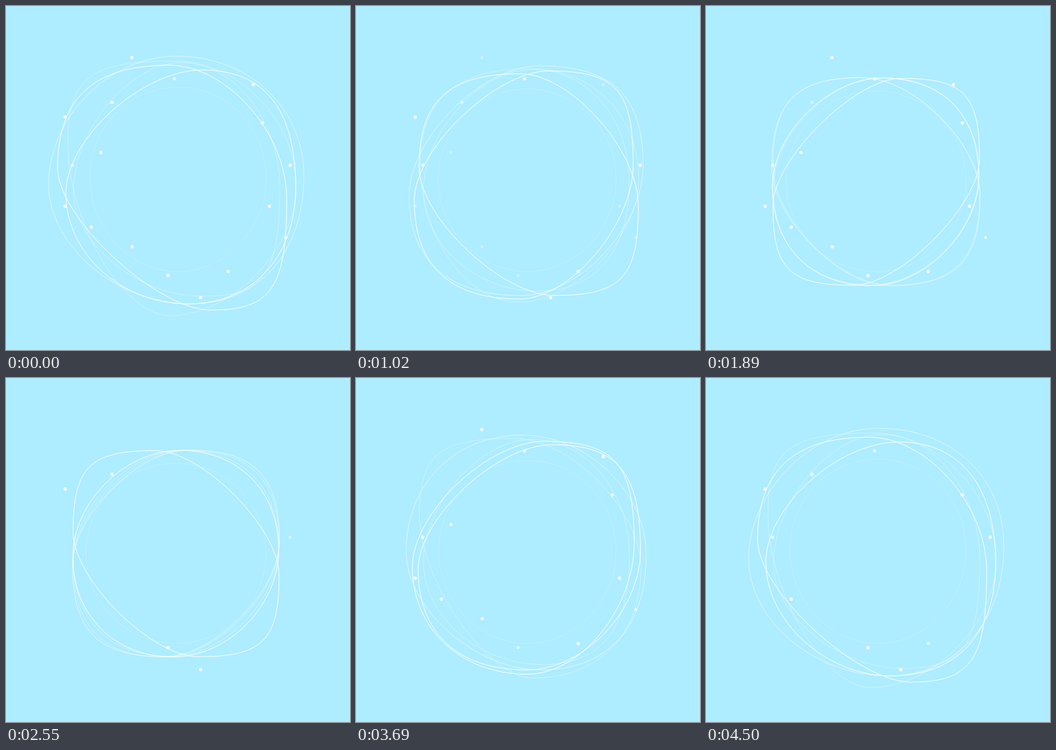
An HTML page with a canvas that plays this animation: 500x500 px, repeating every 4.53 s.

```html
<!DOCTYPE html>
<html lang="en">
<head>
<meta charset="utf-8">
<style>
html, body { margin: 0; height: 100%; overflow: hidden; background: #aeecff; }
canvas { display: block; width: 500px; height: 500px; }
</style>
</head>
<body>
<canvas width="500" height="500"></canvas>
<script>
const ctx = document.querySelector('canvas').getContext('2d');
const LOOP = 4530, TAU = Math.PI * 2, SINE = Math.PI / 2;
const CENTRE = [247, 255];
const rings = [], dots = [];

// Each ring opens on its left, top, right and bottom extremes, relaxes towards
// a circle of radius `rest` mid-loop, and leans along the diagonals on the way.
const ring = (start, alpha, swing, cycles, phase, rest = 149) =>
  rings.push({ start, alpha, swing, cycles, phase, rest });

ring([[75, 235], [237, 86], [408, 280], [298, 442]], .95, 20, 2, 0);
ring([[87, 272], [285, 93], [421, 265], [265, 433]], .95, 34, 3, SINE);
ring([[62, 260], [248, 73], [433, 247], [268, 433]], .55, -20, 3, SINE);
ring([[90, 200], [245, 80], [422, 262], [238, 450]], .35, 22, 2, SINE);
ring([[98, 270], [255, 82], [398, 265], [285, 422]], .35, 5, 1, 0);
ring([[122, 250], [250, 118], [378, 250], [250, 386]], .2, 0, 1, 0, 131);

// Dots of one group go dark together: first at `dark`, then every `period` ms.
const twinkle = (dark, period, ...points) =>
  points.forEach(([x, y, r = 2.4]) => dots.push({ x, y, r, dark, period }));

twinkle(660, 1920, [183, 75], [359.5, 114.5], [138, 213], [86, 291],
  [383, 291], [406.5, 336.5, 2], [183.5, 350]);
twinkle(500, 2260, [245, 106], [97, 231.5]);
twinkle(1020, 1530, [372.5, 170], [124, 321.5]);
twinkle(1470, 2080, [154, 140]);
twinkle(1800, 1900, [86, 161.5], [283, 424]);
twinkle(750, 1000, [413, 231.5]);
twinkle(1380, 1900, [235.5, 392]);
twinkle(2550, 2500, [323, 386]);

function extremesAt({ start, swing, cycles, phase, rest }, t) {
  const angle = TAU * t / LOOP;
  const ease = (1 - Math.cos(angle)) / 2;
  const lean = swing * (Math.cos(cycles * angle + phase) - Math.cos(phase));
  return start.map((point, i) => point.map((from, axis) => {
    const side = i < 2 ? -1 : 1, radial = axis === i % 2;
    const to = CENTRE[axis] + (radial ? side * rest : 0);
    return from + (to - from) * ease + (radial ? 0 : side * lean);
  }));
}

function drawRing(ring, t) {
  const points = extremesAt(ring, t);
  const [left, top, right, bottom] = points;
  const area = (right[0] - left[0]) * (bottom[1] - top[1]) / 4;
  ctx.globalAlpha = ring.alpha;
  ctx.beginPath();
  ctx.moveTo(...left);
  points.forEach(([x, y], i) => {
    const [X, Y] = points[(i + 1) % 4];
    // Stretched quadrants are flatter, squeezed ones fuller.
    const round = Math.min(.8, .55 * area / Math.abs((X - x) * (Y - y)));
    const dx = (X - x) * round, dy = (Y - y) * round;
    if (i % 2) ctx.bezierCurveTo(x + dx, y, X, Y - dy, X, Y);
    else ctx.bezierCurveTo(x, y + dy, X - dx, Y, X, Y);
  });
  ctx.stroke();
}

function drawDot({ x, y, r, dark, period }, t) {
  const lit = t < dark - period / 2;
  const level = .9 - 1.5 * Math.cos(TAU * (t - dark) / period);
  ctx.globalAlpha = lit ? 1 : Math.max(0, Math.min(1, level));
  ctx.beginPath();
  ctx.arc(x, y, r, 0, TAU);
  ctx.fill();
}

function draw() {
  const t = performance.now() % LOOP;
  ctx.globalAlpha = 1;
  ctx.fillStyle = '#aeecff';
  ctx.fillRect(0, 0, 500, 500);
  ctx.fillStyle = ctx.strokeStyle = '#fff';
  rings.forEach(r => drawRing(r, t));
  dots.forEach(d => drawDot(d, t));
  requestAnimationFrame(draw);
}
draw();
</script>
</body>
</html>
```
